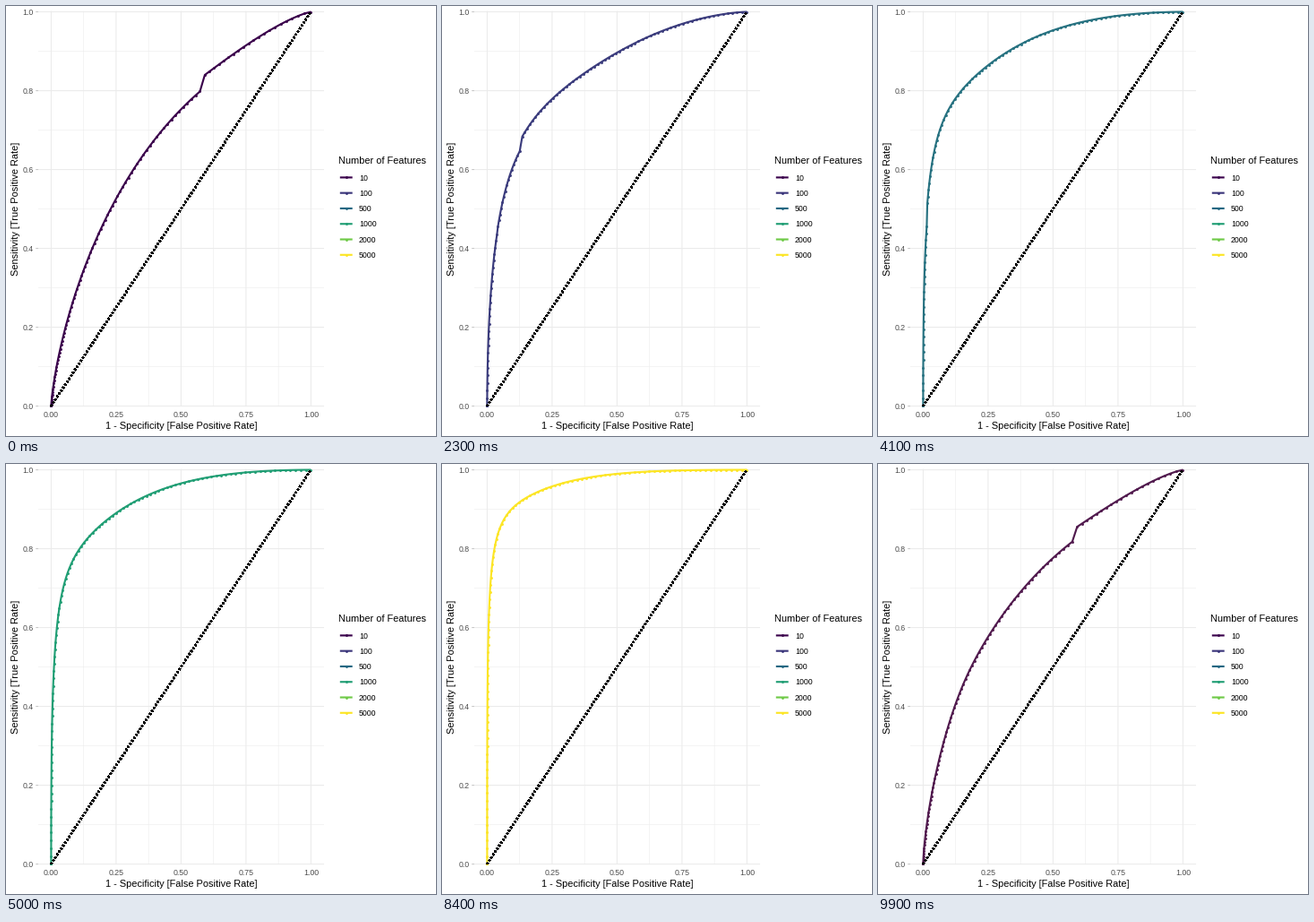
Recreate the animation shown at these times as a matplotlib script. Size 480 by 480 pixels, loop 10000 ms.

```python
import math

import matplotlib.pyplot as plt
import numpy as np
from matplotlib.animation import FuncAnimation
from matplotlib.patches import Rectangle

plt.rcParams["font.family"] = "Liberation Sans"

SIZE, DPI = 480, 100
PX = 72 / DPI  # points per pixel
FRAMES, INTERVAL = 100, 100
PERIOD, HOLD, MOVE = 17, 5, 11  # frames per state, at rest, in transition
SAMPLES = 100

NAMES = ["10", "100", "500", "1000", "2000", "5000"]
COLORS = ["#3A004B", "#3B367B", "#226782", "#209E74", "#6FCA48", "#FCE525"]


def phi(z):
    return np.array([0.5 * math.erfc(-v / math.sqrt(2)) for v in z])


def roc(level, drop=.26, centre=-1.2, jump_at=0, jump=0, warp=1):
    """Binormal ROC curve whose class separation falls along a sigmoid,
    with an optional jump; warp crowds the points towards the origin."""
    z = np.linspace(-6, 6, 2600)
    off = z - jump_at
    sep = level - drop * np.tanh((z - centre) / .75)
    sep += jump * np.sign(off) * np.exp(-abs(off) / .4)
    x = np.r_[0, phi(z), 1]
    y = np.r_[0, phi(z + sep), 1]
    step = np.diff(x + y)
    step = np.where(step > .01, 1e-6, step)  # a jump takes no progress
    walk = np.r_[0, np.cumsum(step)]
    at = np.linspace(0, 1, SAMPLES + 1) ** warp * walk[-1]
    return np.column_stack([np.interp(at, walk, x), np.interp(at, walk, y)])


CURVES = [
    roc(.705, drop=.05, centre=.2, jump_at=.225, jump=.061, warp=1.53),
    roc(1.38, drop=.23, centre=-.6, jump_at=-1.11, jump=.038),
    roc(1.88, centre=-1.1, jump_at=-2.16, jump=.06),
    roc(2.06),
    roc(2.30),
    roc(2.56),
]

RGB2XYZ = np.array([[.4124, .3576, .1805], [.2126, .7152, .0722],
                    [.0193, .1192, .9505]])
WHITE = RGB2XYZ.sum(axis=1)


def to_lab(color):
    c = np.array([int(color[i:i + 2], 16) for i in (1, 3, 5)]) / 255
    c = np.where(c > .04045, ((c + .055) / 1.055) ** 2.4, c / 12.92)
    t = RGB2XYZ @ c / WHITE
    f = np.where(t > .008856, np.cbrt(t), 7.787 * t + 16 / 116)
    return np.array([116 * f[1] - 16, 500 * (f[0] - f[1]), 200 * (f[1] - f[2])])


def to_rgb(lab):
    fy = (lab[0] + 16) / 116
    f = np.array([fy + lab[1] / 500, fy, fy - lab[2] / 200])
    t = np.where(f > .2069, f ** 3, (f - 16 / 116) / 7.787)
    c = np.clip(np.linalg.solve(RGB2XYZ, t * WHITE), 0, 1)
    return np.where(c > .0031308, 1.055 * c ** (1 / 2.4) - .055, 12.92 * c)


LABS = [to_lab(c) for c in COLORS]


def sx(x):
    return 50.4 + 290 * x


def sy(y):
    return 446.6 - 440.1 * y


fig = plt.figure(figsize=(SIZE / DPI, SIZE / DPI), dpi=DPI, facecolor="white")
ax = fig.add_axes([0, 0, 1, 1])
ax.set_xlim(0, SIZE)
ax.set_ylim(SIZE, 0)
ax.axis("off")


def label(x, y, text, size, color="black", **kw):
    ax.text(x, y, text, fontsize=size * PX, color=color, va="baseline", **kw)


def rule(xs, ys, color, width):
    ax.plot(xs, ys, color=color, lw=width * PX, solid_capstyle="butt",
            snap=False, zorder=1)


def grid(xs, ys, width):
    for x in xs:
        rule([sx(x)] * 2, [5.5, 447], "#EBEBEB", width)
    for y in ys:
        rule([36, 355], [sy(y)] * 2, "#EBEBEB", width)


# Panel
xticks, yticks = np.linspace(0, 1, 5), np.linspace(0, 1, 6)
grid(xticks[:-1] + .125, yticks[:-1] + .1, .53)
grid(xticks, yticks, 1.07)
for v in xticks:
    label(sx(v), 459.4, f"{v:.2f}", 8.8, "#4D4D4D", ha="center")
for v in yticks:
    label(31, sy(v) + 3.2, f"{v:.1f}", 8.8, "#4D4D4D", ha="right")
    rule([33.2, 36], [sy(v)] * 2, "#C8C8C8", 1.07)
label(195.4, 472, "1 - Specificity [False Positive Rate]", 11, ha="center")
label(13.6, 226.7, "Sensitivity [True Positive Rate]", 11, ha="center",
      rotation=90, rotation_mode="anchor")

# Legend
label(371, 176.2, "Number of Features", 11)
for i, (name, color) in enumerate(zip(NAMES, COLORS)):
    y = 191.4 + 17.28 * i
    rule([372.8, 386.7], [y, y], color, 2.13)
    ax.plot([379.8], [y], "o", color=color, ms=2.9 * PX, mew=0, snap=False)
    label(393.8, y + 3.2, name, 8.8)

# Curve and chance line
panel = Rectangle((36, 5.3), 319, 442, transform=ax.transData)
curve, = ax.plot([], [], "o-", lw=2.13 * PX, ms=2.9 * PX, mew=0, zorder=3,
                 solid_joinstyle="round", solid_capstyle="butt", snap=False)
chance, = ax.plot([sx(0), sx(1)], [sy(0), sy(1)], color="black", lw=2 * PX,
                  dashes=(1, 1.135), dash_capstyle="butt", zorder=4,
                  antialiased=False)
for line in (curve, chance):
    line.set_clip_path(panel)


def draw(n):
    a = n // PERIOD
    b = (a + 1) % len(CURVES)
    start = PERIOD * a + HOLD
    u = max(0, n - start) / min(MOVE, FRAMES - start)
    x, y = ((1 - u) * CURVES[a] + u * CURVES[b]).T
    curve.set_data(sx(x), sy(y))
    curve.set_color(to_rgb((1 - u) * LABS[a] + u * LABS[b]))
    return curve,


anim = FuncAnimation(fig, draw, frames=FRAMES, interval=INTERVAL,
                     init_func=lambda: draw(0), repeat=True, repeat_delay=0)
plt.show()
```
